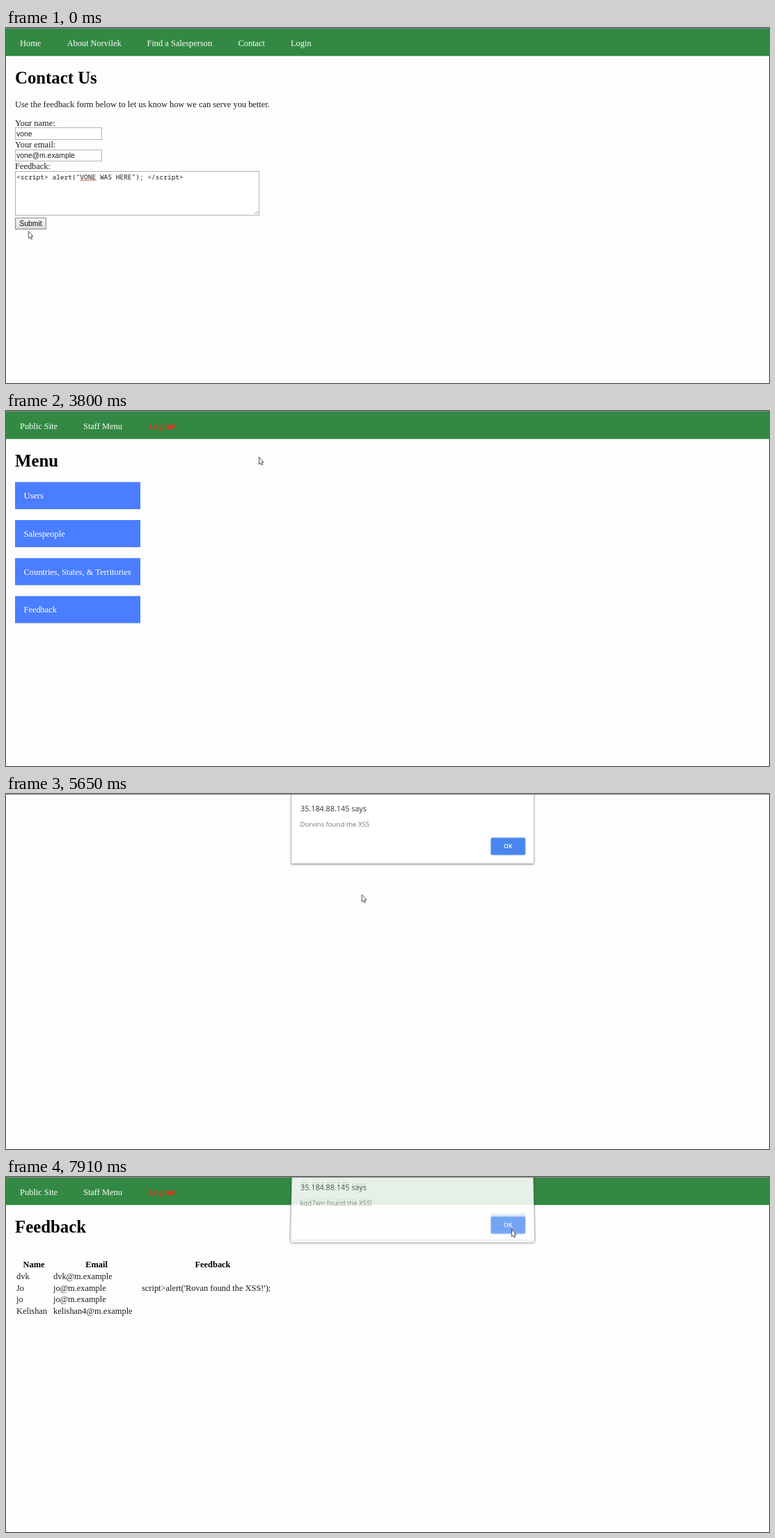
An HTML page for the animation above (8000 ms loop, 1096x511 px).

```html
<!DOCTYPE html>
<html lang="en">
<head>
<meta charset="utf-8">
<title>Feedback form</title>
<style>
  html, body { margin: 0; width: 100%; height: 100%; overflow: hidden; background: #fdfdfd; }
  svg { display: block; width: 100%; height: 100%; }
  text { font: 12.4px "Liberation Serif", "Times New Roman", serif; white-space: pre; }
  .h1 { font-size: 24.8px; font-weight: bold; }
  .bold { font-weight: bold; }
  .mid { text-anchor: middle; }
  .field { font: 10.4px "Liberation Sans", Arial, sans-serif; }
  .code { font: 9.52px "Noto Sans Mono", monospace; }
  .title { font: 10.8px "Open Sans", sans-serif; }
  .message { font: 9.65px "Open Sans", sans-serif; }
  .ok { font: 600 8.8px "Open Sans", sans-serif; text-anchor: middle; }
  .dialog { filter: drop-shadow(0 1px 1.5px rgba(0, 0, 0, .5)); }
</style>
</head>
<body>
<svg id="stage" viewBox="0 0 1096 511"></svg>
<script>
const stage = document.getElementById('stage');
const LOOP = 8000;
const escapeText = s => s.replace(/&/g, '&amp;').replace(/</g, '&lt;');
const text = (x, y, s, cls = '', fill = '#1c1c1c') =>
  `<text x="${x}" y="${y}" class="${cls}" fill="${fill}">${escapeText(s)}</text>`;
const rect = (x, y, w, h, fill, extra = '') =>
  `<rect x="${x}" y="${y}" width="${w}" height="${h}" fill="${fill}" ${extra}/>`;
const path = (d, fill, stroke, width) =>
  `<path d="${d}" fill="${fill}" stroke="${stroke}" stroke-width="${width}"/>`;
const heading = s => text(13, 79.5, s, 'h1', '#000');
const box = (x, y, w, h) => rect(x + .5, y + .5, w - 1, h - 1, '#fff', 'stroke="#b4b4b4"');

// Cursor moves: start, end, number of jumps, destination
const START = [32, 292];
const MOVES = [
  [130, 660, 5, [37, 278]],
  [2180, 3090, 7, [410.5, 27]],
  [3800, 4220, 4, [107.5, 276]],
  [5210, 5800, 5, [730, 73]],
  [6600, 6870, 3, [726, 75]]
];
function cursorAt(t) {
  let pos = START;
  for (const [start, end, count, to] of MOVES) {
    if (t < start) break;
    const jump = Math.min(count, 1 + Math.floor((t - start) * (count - 1) / (end - start) + .001));
    const p = jump / count, eased = p * p * (3 - 2 * p);
    pos = pos.map((v, i) => v + (to[i] - v) * eased);
  }
  return pos;
}
function cursor([x, y], hand) {
  const shape = hand
    ? path('M-1 8.5V1.5Q-1 .5 0 .5T1 1.5V5Q4 4.5 6 6.5V10Q6 12 5 14H0Q-1.5 11.5-3.4 9Q-3.7 7.5-2.5 7.5Z' +
        'M1 5V7.5M2.7 5.2V7.5M4.4 5.7V7.8', '#fff', '#222', .8)
    : path('M.3 .5V10.8L2.5 8.8 4 12 5.6 11.3 4.1 7.9H7Z', '#fff', '#223', .8);
  return `<g transform="translate(${x} ${y})">${shape}</g>`;
}

const navBar = () => rect(0, 0, 1096, 40.3, '#338943');
const publicNav = () => navBar() +
  [[20, 'Home'], [87.5, 'About Norvilek'], [202.5, 'Find a Salesperson'], [333.5, 'Contact'], [409, 'Login']]
    .map(([x, s]) => text(x, 25.5, s, '', '#fff')).join('');
const staffNav = () => navBar() + text(20, 25.5, 'Public Site', '', '#fff') +
  text(111, 25.5, 'Staff Menu', '', '#fff') + text(204.5, 25.5, 'Log out', 'bold', '#f02a18');

function contactPage([, y]) {
  const hover = y < 290;
  let squiggle = 'M106 220';
  for (let i = 0; i < 12; i++) squiggle += `l2 ${i % 2 ? 1.5 : -1.5}`;
  return publicNav() + heading('Contact Us') +
    text(13, 114, 'Use the feedback form below to let us know how we can serve you better.') +
    text(13, 140.5, 'Your name:') + box(13, 143, 125, 18) + text(15, 155.5, 'vone', 'field') +
    text(13, 172, 'Your email:') + box(13, 175, 125, 17) + text(15, 186.5, 'vone@m.example', 'field') +
    text(13, 203, 'Feedback:') + box(13, 206, 351, 64) +
    text(15, 218, '<script> alert("VONE WAS HERE"); <\/script>', 'code') +
    path(squiggle, 'none', '#e33', .8) +
    path('M357 268l5-5M360 268l2-2', 'none', '#888', .8) +
    '<linearGradient id="button" x2="0" y2="1"><stop stop-color="#f6f6f6"/><stop offset="1" stop-color="#d9d9d9"/></linearGradient>' +
    rect(13.5, 273.5, 44, 16, 'url(#button)', `stroke="${hover ? '#666' : '#8c8c8c'}"`) +
    text(19.3, 284.7, 'Submit', 'field', '#111');
}

const receivedPage = () => publicNav() + heading('Feedback Received') +
  text(13, 114, 'Thank you for submitting feedback. We hope to be able to use it to serve you') +
  text(13, 128.3, 'better.');

const menuPage = ([x, y]) => staffNav() + heading('Menu') +
  ['Users', 'Salespeople', 'Countries, States, & Territories', 'Feedback'].map((label, i) => {
    const top = 102.3 + i * 54.7;
    const hover = x < 193 && y > top && y < top + 39;
    return rect(13, top, 180, 39, hover ? '#3f6fe0' : '#4a7dff') + text(25.5, top + 24, label, '', '#fff');
  }).join('');

const ROWS = [
  ['dvk', 'dvk@m.example', ''],
  ['Jo', 'jo@m.example', "script>alert('Rovan found the XSS!');"],
  ['jo', 'jo@m.example', ''],
  ['Kelishan', 'kelishan4@m.example', '']
];
const feedbackPage = (count, centers, columns) => staffNav() + heading('Feedback') +
  ['Name', 'Email', 'Feedback'].map((s, i) => text(centers[i], 130, s, 'bold mid', '#000')).join('') +
  ROWS.slice(0, count).map((row, r) =>
    row.map((s, i) => text(columns[i], 146.8 + r * 16.7, s)).join('')).join('');

// Dialog poses: time, vertical offset, opacity
const POSES = [
  [4770, -6, .7], [4920, -3, .9], [5060, 0, 1],
  [6050, -10, .6], [6170, -3, .9], [6320, 0, 1],
  [6730, -10, .6], [6870, -3, .9], [7020, 0, 1],
  [7260, -10, .6], [7390, -3, .9], [7530, 0, 1],
  [7790, -10, .6], [7910, -6, .7]
];
function dialog([, dy, opacity], message, pressed) {
  const lean = -dy / 6;
  return `<g class="dialog" opacity="${opacity}">` +
    path(`M${410 + lean} -20L${410 - lean} ${100 + dy}H${758 + lean}L${758 - lean} -20Z`, '#fff', '#ccc', .5) +
    `<g transform="translate(0 ${dy})">` +
    text(423, 25, '35.184.88.145 says', 'title', '#333') +
    text(422.5, 46.7, message, 'message', '#757575') + '</g></g>' +
    `<g opacity="${opacity}" transform="translate(0 ${dy})">` +
    rect(696.5, 63, 49.5, 24.8, pressed ? '#3a72d8' : '#4886ee', 'rx="2" stroke="#86aff5"') +
    text(721, 78.4, 'OK', 'ok', '#fff') + '</g>';
}
function dialogs(t) {
  const i = POSES.findLastIndex(pose => t >= pose[0]);
  if (i < 0) return '';
  const message = t < 6730 ? 'Dorvins found the XSS'
    : t < 7260 ? 'Kelishan has found the XSS vulnerability' : 'kqd7wn found the XSS!';
  const pressed = t >= 5920 && t < 6050 || t >= 6600 && t < 6730;
  const trail = i > 0 && POSES[i - 1][1] === -10 ? dialog(POSES[i - 1], message) : '';
  return trail + dialog(POSES[i], message, pressed);
}

function page(t, pos) {
  if (t < 1490) return contactPage(pos);
  if (t < 3370) return receivedPage();
  if (t < 4770) return menuPage(pos);
  if (t < 6050) return '';
  if (t < 6730) return feedbackPage(1, [52, 184, 339], [15, 91.5, 0]);
  if (t < 7260) return feedbackPage(3, [35, 109, 281], [15, 57.5, 163]);
  return feedbackPage(4, [40, 130, 297], [15, 68, 195]);
}

let shown = '';
function draw(now) {
  const t = now % LOOP;
  const pos = cursorAt(t);
  const hand = t >= 3090 && t < 3370 || t >= 4220 && t < 5210;
  const picture = rect(0, 0, 1096, 511, '#fdfdfd') + page(t, pos) +
    dialogs(t) + rect(0, 0, 1096, 1, '#8a8a8a') + cursor(pos, hand);
  if (picture !== shown) stage.innerHTML = shown = picture;
}
const begin = performance.now();
function tick() {
  draw(performance.now() - begin);
  requestAnimationFrame(tick);
}
tick();
</script>
</body>
</html>
```
